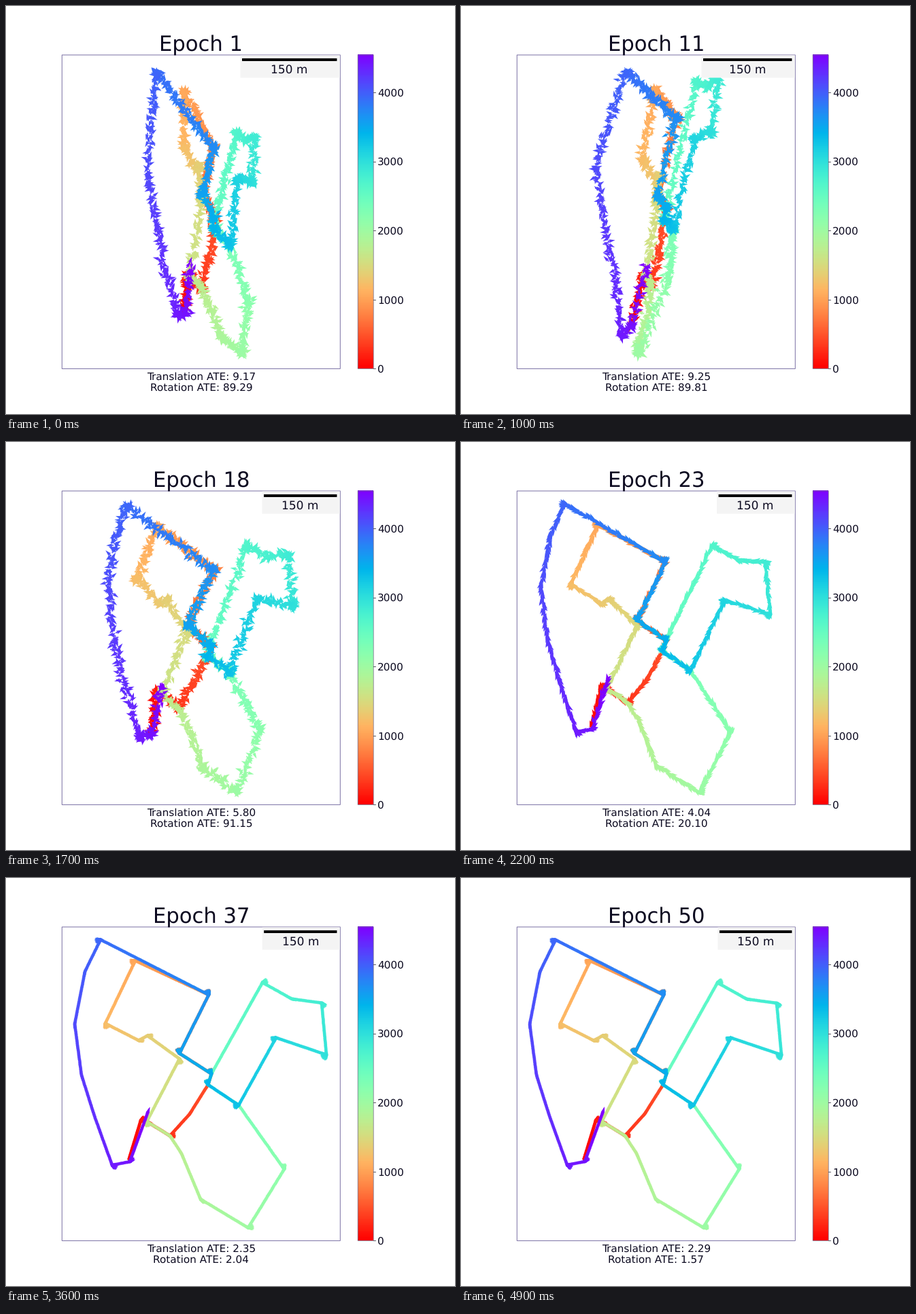
These frames come from a looping animation (660 px wide and 600 px high, 7 s). A matplotlib script:

```python
import numpy as np
import matplotlib.pyplot as plt
from matplotlib.animation import FuncAnimation
from matplotlib.collections import PolyCollection
from matplotlib.patches import Rectangle

W, H, DPI = 660, 600, 100
EPOCHS, FRAMES = 50, 70
ARROWS = 2270
LEFT, RIGHT, TOP, BOTTOM = 82.3, 491.3, 72, 533.4
V_MAX = 4541

# Junctions and bends of the town, in pixels.
PLACES = dict(
    a=(139, 91), b=(298, 172), c=(146, 214), d=(255, 258), e=(302, 288),
    f=(377, 154), g=(464, 184), h=(471, 260), i=(397, 235), j=(342, 334),
    k=(409, 428), l=(356, 514), m=(286, 472), n=(207, 358), o=(241, 379),
    p=(156, 422), q=(101, 215), r=(190, 122), s=(180, 416), t=(209, 343),
    u=(198, 357), v=(270, 347), w=(297, 304), x=(195, 239), y=(208, 232),
    z=(255, 266), A=(116, 138), B=(111, 290), C=(130, 350), G=(420, 178),
    M=(258, 405), P=(182, 417))
DRIVE = "sunovwedbrcxyznoMmlkjwefGghijwedbaAqBCpPt"

# Where the early estimates put some of the places.
ANCHORS = "abcdfhjklnpq"
EARLY = {
    1: [(221, 98), (305, 209), (262, 208), (288, 277), (340, 186), (362, 258),
        (329, 352), (356, 435), (347, 510), (270, 398), (253, 454), (208, 245)],
    6: [(220, 92), (314, 183), (236, 192), (304, 245), (340, 152), (406, 266),
        (366, 322), (400, 433), (357, 510), (300, 338), (254, 382), (165, 200)],
    11: [(243, 97), (317, 165), (267, 228), (289, 278), (347, 112), (368, 185),
         (312, 328), (305, 400), (262, 510), (272, 395), (236, 485), (197, 240)],
    18: [(178, 95), (305, 188), (192, 202), (267, 270), (354, 153), (422, 240),
         (328, 338), (373, 422), (340, 514), (228, 370), (197, 434), (150, 215)],
}

STAT_EPOCHS = [1, 6, 11, 18, 30, 37, 50]
TRANS = [9.17, 7.83, 9.25, 5.80, 2.43, 2.35, 2.29]
ROT = [89.29, 89.86, 89.81, 91.15, 2.42, 2.04, 1.57]
POSE_EPOCHS = [*EARLY, 30, 42]
BAR_X = [347, 367, 356, 379, 378, 380]


def warp(pts, src, dst):
    """Thin-plate spline that carries src onto dst."""
    def basis(p):
        r2 = ((p[:, None] - src) ** 2).sum(-1) + 1e-9
        return np.hstack([r2 * np.log(r2), np.ones((len(p), 1)), p])

    n = len(src)
    system = np.zeros((n + 3, n + 3))
    system[:n] = basis(src)
    system[n:, :n] = system[:n, n:].T
    return basis(pts) @ np.linalg.solve(system, np.vstack([dst, np.zeros((3, 2))]))


def headings(pts):
    dx, dy = np.diff(pts, axis=0).T
    return np.unwrap(np.arctan2(dy, dx))


final = np.array([PLACES[name] for name in DRIVE], float)
anchors = np.array([PLACES[name] for name in ANCHORS], float)
poses = [warp(final, anchors, np.array(dst, float)) for dst in EARLY.values()]
poses += [(final - 300) * (1, 1.011) + 300, final]

# The vehicle lingers at a place in proportion to how far it turns there.
legs = np.hypot(*np.diff(final, axis=0).T)
dwell = 22 * np.abs(np.diff(headings(final)))
spans = np.zeros(2 * len(legs) - 1)
spans[::2], spans[1::2] = legs, dwell
times = np.append(0, np.cumsum(spans) / spans.sum()) ** 0.9
arrow_t = np.linspace(0, 1, ARROWS)

DART = np.array([(-2, -.85), (1, -.85), (0, -2.6), (9, 0),
                 (0, 2.6), (1, .85), (-2, .85)])


def pose_at(epoch):
    k = np.searchsorted(POSE_EPOCHS, epoch, side="right") - 1
    if k == len(poses) - 1:
        return poses[k]
    start, end = POSE_EPOCHS[k:k + 2]
    u = (epoch - start) / (end - start)
    return poses[k] + (poses[k + 1] - poses[k]) * u * (2 - u)


def smooth(v, n=9):
    return np.convolve(np.pad(v, n // 2, mode="edge"), np.ones(n) / n, "valid")


def arrows(epoch, rot):
    rng = np.random.default_rng(epoch)
    pose = pose_at(epoch)
    stops = np.repeat(pose, 2, axis=0)[1:-1]
    x, y = (smooth(np.interp(arrow_t, times, c)) for c in stops.T)
    heading = np.interp(arrow_t, times, np.repeat(headings(pose), 2))
    disorder = min(1, rot / 89)
    heading += rng.uniform(-np.pi, np.pi, ARROWS) * disorder
    x += rng.normal(0, 2.3, ARROWS) * disorder
    y += rng.normal(0, 2.3, ARROWS) * disorder
    c, s = np.cos(heading)[:, None], np.sin(heading)[:, None]
    dx, dy = DART.T
    return np.stack([x[:, None] + dx * c - dy * s,
                     y[:, None] + dx * s + dy * c], axis=-1)


def stat(epoch, values):
    return np.exp(np.interp(epoch, STAT_EPOCHS, np.log(values)))


plt.rcParams["font.family"] = "DejaVu Sans"
plt.rcParams["text.hinting"] = "none"
fig = plt.figure(figsize=(W / DPI, H / DPI), dpi=DPI, facecolor="white")
ax = fig.add_axes([0, 0, 1, 1])
ax.axis("off")


def px(size):
    return size * 72 / DPI


def label(x, y, text, size, ha="center", **kw):
    return ax.text(x, y, text, fontsize=px(size), ha=ha, va="baseline",
                   color="#0c0a20", **kw)


def box(x0, y0, x1, y1, **kw):
    return ax.add_patch(Rectangle((x0, y0), x1 - x0, y1 - y0, snap=False, **kw))


# Colour bar
CB_L, CB_R = 517.2, 540.2
ax.imshow(np.linspace(1, 0, 256)[:, None], cmap="rainbow_r", vmin=0, vmax=1,
          extent=(CB_L, CB_R, BOTTOM, TOP), aspect="auto",
          interpolation="nearest")
box(CB_L, TOP, CB_R, BOTTOM, fill=False, ec="#77708c", lw=px(0.8))
for v in range(0, 5000, 1000):
    ty = BOTTOM - (BOTTOM - TOP) * v / V_MAX
    ax.plot([CB_R, CB_R + 3], [ty, ty], color="#333340", lw=px(0.8))
    label(CB_R + 5.8, ty + 5.7, str(v), 15.3, ha="left")

# Map
darts = PolyCollection([], facecolors=plt.get_cmap("rainbow_r")(arrow_t),
                       edgecolors="none", zorder=2)
ax.add_collection(darts)
box(LEFT, TOP, RIGHT, BOTTOM, fill=False, ec="#7a70a4", lw=px(1), zorder=3)

# Scale bar
BAR_R = 486.4
panel = box(345, TOP + .5, RIGHT - .5, 105.5, fc="#f4f4f4", ec="none", zorder=4)
bar = box(347, 77, BAR_R, 81, fc="black", ec="none", zorder=5)
bar_text = label(416, 98.7, "150 m", 17, zorder=5)

MID = (LEFT + RIGHT) / 2
title = label(MID, 67, "", 30.6)
trans_text = label(MID, 549.5, "", 15.2)
rot_text = label(MID, 566, "", 15.2)

ax.set_xlim(0, W)
ax.set_ylim(H, 0)


def draw(frame):
    epoch = min(frame, EPOCHS - 1) + 1
    trans, rot = stat(epoch, TRANS), stat(epoch, ROT)
    darts.set_verts(arrows(epoch, rot))
    x = np.interp(epoch, POSE_EPOCHS, BAR_X)
    panel.set_x(x - 2.5)
    panel.set_width(RIGHT - .5 - x + 2.5)
    bar.set_x(x)
    bar.set_width(BAR_R - x)
    bar_text.set_x((x + BAR_R) / 2)
    title.set_text(f"Epoch {epoch}")
    trans_text.set_text(f"Translation ATE: {trans:.2f}")
    rot_text.set_text(f"Rotation ATE: {rot:.2f}")
    return darts, panel, bar, bar_text, title, trans_text, rot_text


anim = FuncAnimation(fig, draw, frames=FRAMES, interval=100, repeat=True,
                     repeat_delay=0, blit=False)
plt.show()
```
